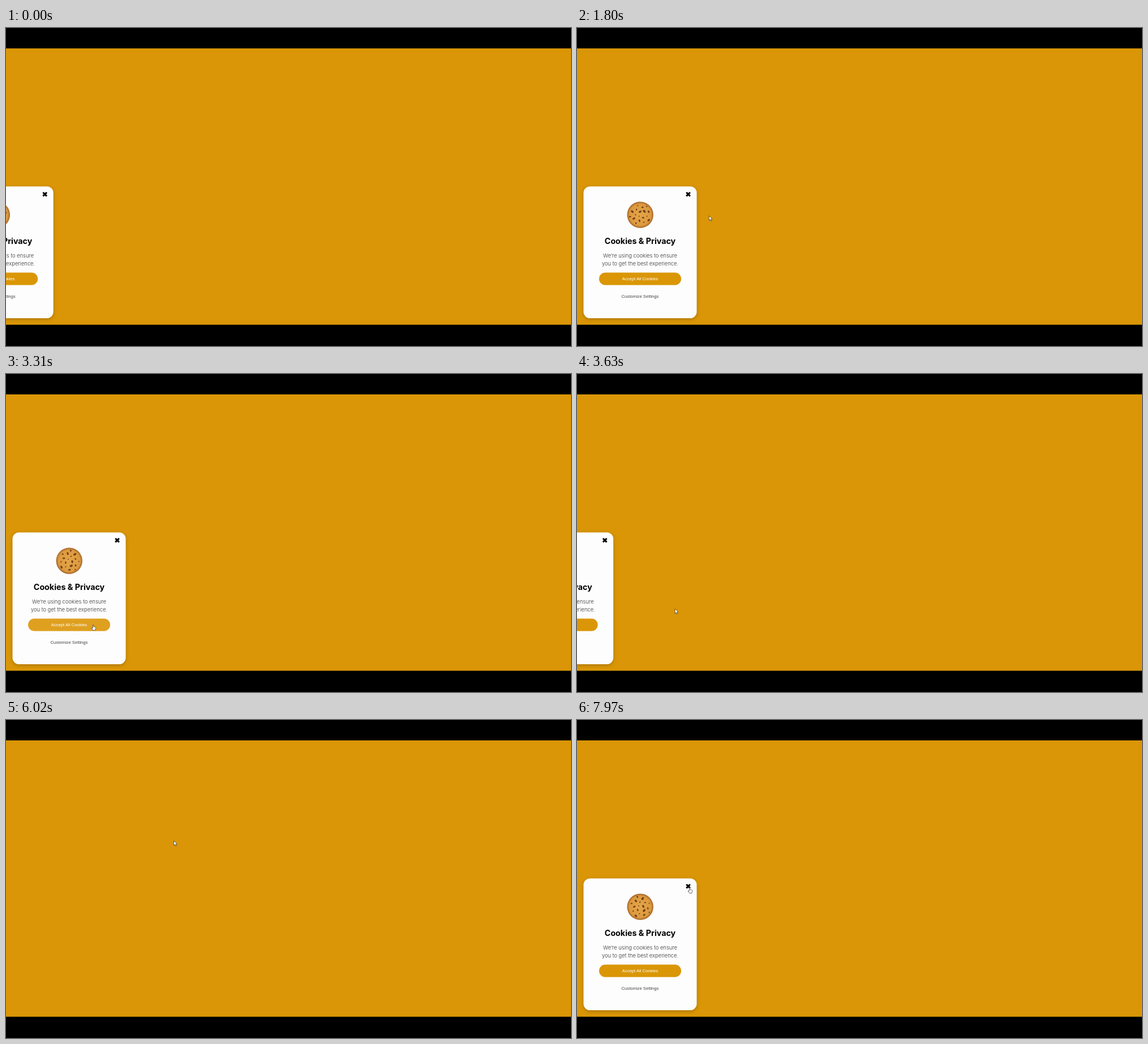
These frames come from a looping animation (998x561 px, 8000 ms). An HTML page:

```html
<!DOCTYPE html>
<html lang="en">
<head>
<meta charset="utf-8">
<title>Cookie notice</title>
<style>
  html, body { margin: 0; width: 100%; height: 100%; overflow: hidden; background: #000; }
  svg { display: block; width: 100vw; height: 100vh; }
  text { text-anchor: middle; }
  .rounded { font-family: Inter, sans-serif; }
  .title { font-size: 14.25px; font-weight: 700; }
  .body { font-size: 9.4px; font-weight: 300; fill: #333; }
  .label { font-family: "Liberation Sans", Arial, sans-serif; font-size: 7.65px; }
  .panel { filter: drop-shadow(0 2px 3px rgba(60, 35, 0, .3)); }
</style>
</head>
<body>
<svg viewBox="0 0 998 561">
  <defs>
    <radialGradient id="dough">
      <stop offset="0" stop-color="#e4a548"/>
      <stop offset=".82" stop-color="#dc9a3e"/>
      <stop offset="1" stop-color="#a4632a"/>
    </radialGradient>
    <clipPath id="page"><rect y="36" width="998" height="487.5"/></clipPath>
  </defs>
  <g clip-path="url(#page)">
    <rect y="36" width="998" height="488" fill="#da9606"/>
    <g id="card">
      <rect class="panel" x="11.5" y="279.5" width="200" height="232.5" rx="11.5" fill="#fdfdfd"/>
      <path d="M193.2 290l6.6 6.6m0-6.6l-6.6 6.6" stroke="#000" stroke-width="3"/>
      <g id="cookie"><circle r="23.2" fill="url(#dough)"/></g>
      <text class="rounded title" x="111.5" y="381">Cookies &amp; Privacy</text>
      <text class="rounded body" x="111.5" y="405">We’re using cookies to ensure</text>
      <text class="rounded body" x="111.5" y="418.6">you to get the best experience.</text>
      <rect id="accept" x="39" y="431.5" width="145" height="22" rx="11"/>
      <text class="label" x="111.5" y="445" fill="#fff">Accept All Cookies</text>
      <text class="label" x="111.5" y="476.2" fill="#444">Customize Settings</text>
    </g>
  </g>
  <g id="pointer" stroke="#333" stroke-width=".7" stroke-linejoin="round" fill="#fff">
    <path id="arrow" d="M0 0V8.2L1.9 6.5 3.2 9.6 4.5 9 3.2 6H5.7Z"/>
    <path id="hand" d="M-.8 .8Q0-.4 .8 .8V3.6L3.6 4.3Q4.7 4.6 4.6 5.8L3.8 10H-.4L-2.9 6.4Q-2.8 5.2-1.8 5.8L-.8 6.7Z"/>
  </g>
</svg>
<script>
const LOOP = 8000, SLIDE = 600, HIDDEN = 223, SPIN = 5000;
const FIRST_ENTRY = -154, LEAVE = 3400, SECOND_ENTRY = 6480;
const $ = id => document.getElementById(id);
const show = (el, on) => el.setAttribute('visibility', on ? 'visible' : 'hidden');
const mix = (a, b, k) => a + (b - a) * k;
const clamp = x => Math.min(1, Math.max(0, x));

// Pointer stops; each move starts fast and slows into the next stop.
const STOPS = [
  { t: 860, x: 257, y: 44 },
  { t: 1710, x: 255, y: 301 },
  { t: 2510, x: 154, y: 442 },
  { t: LEAVE, x: 154, y: 442 },
  { t: 4110, x: 189, y: 391 },
  { t: 4550, x: 386, y: 182 },
  { t: 5010, x: 296.5, y: 213 },
  { t: 6160, x: 296.5, y: 213 },
  { t: 6360, x: 334, y: 238 },
  { t: 6840, x: 229.5, y: 310 },
  { t: 7940, x: 199, y: 295.5 }
];

function pointerAt(t) {
  const next = STOPS.findIndex(stop => stop.t > t);
  if (next === 0) return null;
  if (next < 0) return STOPS[STOPS.length - 1];
  const a = STOPS[next - 1], b = STOPS[next];
  const k = 1 - (1 - (t - a.t) / (b.t - a.t)) ** 2;
  return { x: mix(a.x, b.x, k), y: mix(a.y, b.y, k) };
}

// CSS "ease": cubic-bezier(.25, .1, .25, 1), solved by bisection
function ease(x) {
  const bezier = (u, p, q) => 3 * u * (1 - u) * mix(p, q, u) + u ** 3;
  if (x === 0 || x === 1) return x;
  let lo = 0, hi = 1;
  for (let i = 0; i < 24; i++) {
    const mid = (lo + hi) / 2;
    if (bezier(mid, .25, .25) < x) lo = mid; else hi = mid;
  }
  return bezier(lo, .1, 1);
}

function cardOffset(t) {
  const slide = start => ease(clamp((t - start) / SLIDE));
  if (t < LEAVE) return HIDDEN * (slide(FIRST_ENTRY) - 1);
  if (t < SECOND_ENTRY) return -HIDDEN * slide(LEAVE);
  return HIDDEN * (slide(SECOND_ENTRY) - 1);
}

// Chips follow a sunflower spiral, so they spread evenly over the cookie.
function addChips(count) {
  for (let i = 0; i < count; i++) {
    const size = 1.2 + i * 5 % 7 * .28;
    const chip = document.createElementNS('http://www.w3.org/2000/svg', 'ellipse');
    chip.setAttribute('rx', size);
    chip.setAttribute('ry', size * .65);
    chip.setAttribute('fill', '#74401c');
    chip.setAttribute('transform',
      `rotate(${i * 137.5}) translate(${19 * Math.sqrt((i + .5) / count)}) rotate(${i * 67})`);
    $('cookie').append(chip);
  }
}

function draw(t) {
  const offset = cardOffset(t), tip = pointerAt(t);
  const over = (x, y, w, h) => tip && Math.abs(tip.x - offset - x - w / 2) < w / 2 && Math.abs(tip.y - y - h / 2) < h / 2;
  const onAccept = over(39, 431.5, 145, 22);
  const onLink = onAccept || over(190, 287, 13, 13);

  $('card').setAttribute('transform', `translate(${offset} 0)`);
  show($('card'), offset > -HIDDEN);
  $('cookie').setAttribute('transform', `translate(111.7 329.6) rotate(${t / SPIN * 360})`);
  $('accept').setAttribute('fill', onAccept ? '#dfa020' : '#da9606');
  show($('arrow'), tip && !onLink);
  show($('hand'), tip && onLink);
  if (tip) $('pointer').setAttribute('transform', `translate(${tip.x} ${tip.y})`);
}

addChips(18);
const begin = performance.now();
(function tick() {
  draw((performance.now() - begin) % LOOP);
  requestAnimationFrame(tick);
})();
</script>
</body>
</html>
```
